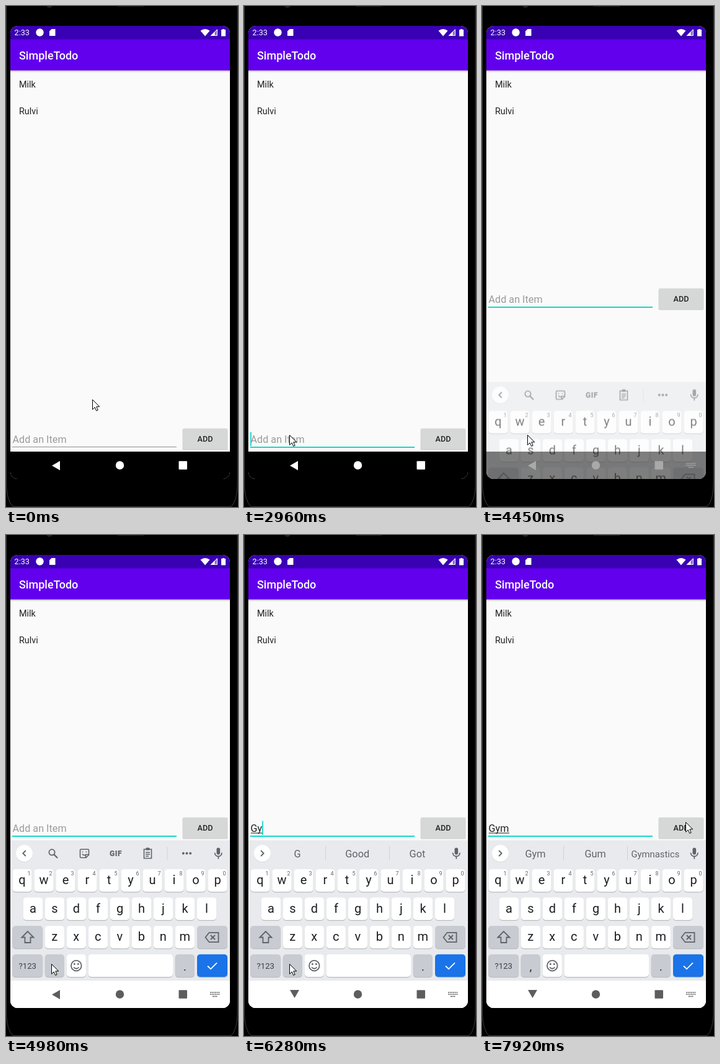
Recreate the animation shown at these times as an HTML page. Size 374x805 px, loop 8000 ms.

```html
<!DOCTYPE html>
<html lang="en">
<head>
<meta charset="utf-8">
<title>Todo app</title>
<style>
html, body { margin: 0; width: 100%; height: 100%; overflow: hidden; background: #000; }
svg { display: block; width: 100vw; height: 100vh; font-family: Roboto, "Noto Sans", sans-serif; }
.mid { text-anchor: middle; }
.line { fill: none; stroke: #5f6368; stroke-width: 1.8; }

/* every change is a hard step on one shared 8 s clock */
#cursor, #field, #hint, #rule, #caret, #under, .typed, #board, #tools, #chevron,
#words, .set, #nav, #navbg, #back, #kbd { animation: 8s step-end infinite; }

#cursor { animation-name: cursor; }
@keyframes cursor {
  0% { transform: translate(139px, 632px); }
  6.25% { transform: translate(180px, 612px); }
  7.75% { transform: translate(205px, 555px); }
  9.25% { transform: translate(128px, 499px); }
  11.125% { transform: translate(139px, 465px); }
  14.25% { transform: translate(149px, 451px); }
  15.75% { transform: translate(115px, 560px); }
  17.25% { transform: translate(78px, 666px); }
  19.125% { transform: translate(75px, 681px); }
  20.625% { transform: translate(73px, 689px); }
  93.75% { transform: translate(244px, 526px); }
  95.625% { transform: translate(302px, 482px); }
  97.125% { transform: translate(330px, 449px); }
  99%, 100% { transform: translate(328px, 461px); }
}

#field { animation-name: field; }
@keyframes field { 0% { transform: none; } 55.625%, 100% { transform: translateY(-225px); } }
#rule { animation-name: rule; }
@keyframes rule {
  0% { fill: #8e8e8e; height: 1px; }
  33.625%, 100% { fill: #1ad6c8; height: 2px; }
}
#caret { animation-name: caret; }
@keyframes caret {
  0% { opacity: 0; transform: none; }
  33.625% { opacity: 1; transform: none; }
  47.125% { opacity: 0; transform: none; }
  54.125% { opacity: 1; transform: none; }
  55.625% { opacity: 0; transform: none; }
  68.875% { opacity: 1; transform: translateX(11px); }
  75.375% { opacity: 1; transform: translateX(19px); }
  85.25% { opacity: 1; transform: translateX(33px); }
  95.625%, 100% { opacity: 0; transform: translateX(33px); }
}
#hint { animation-name: hint; }
@keyframes hint { 0% { opacity: 1; } 68.875%, 100% { opacity: 0; } }
#c1 { animation-name: c1; }
#c2 { animation-name: c2; }
#c3 { animation-name: c3; }
@keyframes c1 { 0% { visibility: hidden; } 68.875%, 100% { visibility: visible; } }
@keyframes c2 { 0% { visibility: hidden; } 75.375%, 100% { visibility: visible; } }
@keyframes c3 { 0% { visibility: hidden; } 85.25%, 100% { visibility: visible; } }
#under { animation-name: under; }
@keyframes under {
  0% { width: 0; }
  72.25% { width: 11px; }
  78.5% { width: 19px; }
  89.875%, 100% { width: 33px; }
}

#board { animation-name: board; }
@keyframes board {
  0% { opacity: 0; transform: translateY(114px); }
  55.625% { opacity: .55; transform: translateY(113.5px); }
  62.25%, 100% { opacity: 1; transform: none; }
}
#tools { animation-name: tools; }
@keyframes tools { 0% { opacity: 1; } 68.875% { opacity: .6; } 70.375% { opacity: .25; } 72.25%, 100% { opacity: 0; } }
#chevron { animation-name: chevron; transform-origin: 29.5px 511.5px; }
@keyframes chevron {
  0% { transform: none; }
  68.875% { transform: rotate(60deg); }
  70.375% { transform: rotate(120deg); }
  72.25%, 100% { transform: rotate(180deg); }
}
#words { animation-name: words; }
@keyframes words { 0% { opacity: 0; } 72.25% { opacity: .35; } 73.75% { opacity: .75; } 75.375%, 100% { opacity: 1; } }
#s1 { animation-name: s1; }
#s2 { animation-name: s2; }
#s3 { animation-name: s3; }
@keyframes s1 { 0% { opacity: 1; } 80.25%, 100% { opacity: 0; } }
@keyframes s2 { 0% { opacity: 0; } 80.25% { opacity: 1; } 91.75%, 100% { opacity: 0; } }
@keyframes s3 { 0% { opacity: 0; } 91.75%, 100% { opacity: 1; } }

#navbg { animation-name: navbg; }
@keyframes navbg { 0% { fill: #000; } 55.625% { fill: rgba(0, 0, 0, .5); } 62.25%, 100% { fill: #fff; } }
#nav { animation-name: nav; fill: currentColor; stroke: none; }
@keyframes nav { 0% { color: #fff; } 55.625% { color: #a9a9a9; } 62.25%, 100% { color: #5d5d5f; } }
#back { animation-name: back; transform-origin: 80.5px 737.5px; }
@keyframes back {
  0% { transform: none; }
  68.875% { transform: rotate(-30deg); }
  70.375% { transform: rotate(-60deg); }
  72.25%, 100% { transform: rotate(-90deg); }
}
#kbd { animation-name: kbd; }
@keyframes kbd { 0% { opacity: 0; } 40.5%, 100% { opacity: 1; } }
</style>
</head>
<body>
<svg viewBox="0 0 374 805" preserveAspectRatio="none">
  <defs>
    <clipPath id="screen"><rect x="7" y="32" width="354" height="728" rx="12"/></clipPath>
    <linearGradient id="shade" x2="0" y2="1">
      <stop offset="0" stop-color="#000" stop-opacity=".25"/>
      <stop offset="1" stop-color="#000" stop-opacity="0"/>
    </linearGradient>
  </defs>

  <rect width="374" height="805"/>
  <path d="M.5 0V768Q1 794 11 804.5H363Q373 794 373.2 768V0" fill="none" stroke="#3c3c3c"/>
  <circle cx="70" cy="-2" r="5" fill="#222"/>
  <rect x="180" width="42" height="1" fill="#222"/>

  <g clip-path="url(#screen)">
    <rect x="7" y="32" width="354" height="728" fill="#fafafa"/>
    <rect x="7" y="103" width="354" height="4" fill="url(#shade)"/>
    <rect x="7" y="32" width="354" height="22" fill="#3a00b4"/>
    <rect x="7" y="53.5" width="354" height="50" fill="#6200ee"/>

    <g fill="#fff">
      <text x="13.5" y="47.3" font-size="12.7">2:33</text>
      <circle cx="54.5" cy="42.5" r="6.2"/>
      <path d="M73.5 37H79.5V48H70V40.5Z"/>
      <path d="M313.5 39.7Q321 34.3 328.5 39.7L321 48.5Z"/>
      <path d="M341 36.5V48H329.5Z" fill-opacity=".4"/>
      <path d="M336.5 41V48H329.5Z"/>
      <path d="M340.3 38V47.4H330.8Z" fill="none" stroke="#fff"/>
      <path d="M349 37H352V38H354V48.5H347V38H349Z"/>
      <text x="21" y="85.8" font-size="18" font-weight="500">SimpleTodo</text>
    </g>
    <g font-size="14.4" fill="#222">
      <text x="21" y="131">Milk</text>
      <text x="21" y="174.3">Rulvi</text>
    </g>

    <g id="field">
      <text id="hint" x="10.5" y="702" font-size="16.2" fill="#9b9b9b">Add an Item</text>
      <text x="10.5" y="702" font-size="16.2" fill="#222"><tspan id="c1" class="typed">G</tspan><tspan id="c2" class="typed">y</tspan><tspan id="c3" class="typed">m</tspan></text>
      <rect id="under" x="11" y="703.4" width="0" height="1.1" fill="#333"/>
      <rect id="rule" x="10" y="708" width="265" height="1" fill="#8e8e8e"/>
      <rect id="caret" x="10.2" y="684.5" width="1.8" height="22.5" fill="#1ad6c8"/>
      <rect x="284.5" y="679.5" width="73" height="34" rx="2" fill="#000" fill-opacity=".16"/>
      <rect x="285" y="678.8" width="72" height="33.2" rx="2" fill="#d6d7d7"/>
      <text class="mid" x="321" y="699.8" font-size="12.6" font-weight="500" fill="#222">ADD</text>
    </g>

    <g id="board">
      <rect x="7" y="490.5" width="354" height="270" fill="#e8eaed"/>
      <circle cx="29.5" cy="512.2" r="13.6" fill="#000" fill-opacity=".1"/>
      <circle cx="29.5" cy="511.5" r="13.5" fill="#fff"/>
      <path id="chevron" class="line" d="M31.8 507L27.3 511.5L31.8 516"/>
      <g id="tools">
        <g class="line">
          <circle cx="74" cy="509.8" r="4.6"/>
          <path d="M77.3 513.2L83 519" stroke-width="2.2"/>
          <path d="M121 505H132Q133.500 505 133.500 506.500V514L129 518.500H121Q119.500 518.500 119.500 517V506.500Q119.500 505 121 505ZM133 513.500H128.500V518" stroke-width="1.6"/>
          <path d="M123 512.500Q125 515.500 128 514M123.500 508.500V510M129.500 508.500V510" stroke-width="1.5"/>
          <path d="M222.500 505H234.500V519.500H222.500ZM225 510H232M225 513H232M225 516H230" stroke-width="1.6"/>
        </g>
        <rect x="225.500" y="502.500" width="6" height="4" rx="1" fill="#5f6368"/>
        <text class="mid" x="177" y="515.500" font-size="12" font-weight="900" letter-spacing=".6" fill="#5f6368">GIF</text>
        <rect x="259.500" y="501" width="1" height="21" fill="#d2d4d8"/>
        <g fill="#5f6368">
          <circle cx="285.800" cy="511.500" r="1.900"/>
          <circle cx="291.500" cy="511.500" r="1.900"/>
          <circle cx="297.200" cy="511.500" r="1.900"/>
        </g>
      </g>
      <rect x="339.500" y="502.500" width="5.600" height="11" rx="2.800" fill="#5f6368"/>
      <path class="line" d="M336.500 510.500Q337 516.300 342.300 516.300T348 510.500M342.300 516V520.500" stroke-width="1.600"/>
      <g id="words" class="mid" font-size="16.300" fill="#5f6368">
        <path d="M131.500 500V523M234.500 500V523" stroke="#d0d2d6"/>
      </g>
      <g id="keys"></g>
      <g class="line">
        <path d="M35 637L25.500 646.500H30.500V655H39.500V646.500H44.500Z"/>
        <path d="M327.500 638.800H342.500V654.200H327.500L321.500 646.500ZM329.800 643L337 650M337 643L329.800 650"/>
        <circle cx="113.300" cy="692" r="8.300"/>
        <path d="M109 694.500Q113.300 699 117.600 694.500"/>
        <path d="M325 692.500L330 697.300L340 687.300" stroke="#fff" style="stroke:#fff"/>
      </g>
      <circle cx="110.300" cy="689.500" r="1.400" fill="#5f6368"/>
      <circle cx="116.300" cy="689.500" r="1.400" fill="#5f6368"/>
    </g>

    <rect id="navbg" x="7" y="716" width="354" height="44"/>
    <g id="nav">
      <path id="back" d="M87 731V746L74 738.500Z"/>
      <circle cx="183.500" cy="738" r="6.700"/>
      <rect x="278.500" y="731.300" width="13.500" height="13.500" rx="1"/>
      <path id="kbd" d="M329 735H344.500M329 738H344.500M333 741.300H340.500" fill="none" stroke="currentColor" stroke-width="1.700" stroke-dasharray="1.900 .8"/>
    </g>
  </g>

  <path id="cursor" d="M.5 .5V16.300L4.200 12.800L6.700 18.400L9.200 17.300L6.800 11.800H11.800Z" fill="#fff" stroke="#000"/>
</svg>
<script>
const NS = "http://www.w3.org/2000/svg";
const keys = document.getElementById("keys");

function add(parent, tag, attrs, text) {
  const el = document.createElementNS(NS, tag);
  for (const k in attrs) el.setAttribute(k, attrs[k]);
  if (text) el.textContent = text;
  parent.appendChild(el);
  return el;
}

function key(x, y, w, fill) {
  add(keys, "rect", { x, y: y + 1, width: w, height: 36.5, rx: 5, fill: "#000", "fill-opacity": .2 });
  add(keys, "rect", { x, y, width: w, height: 36.3, rx: 5, fill });
}

function label(x, y, size, text, fill = "#1c1d1f") {
  add(keys, "text", { class: "mid", x, y, "font-size": size, fill }, text);
}

[["qwertyuiop", 26, 537], ["asdfghjkl", 43.5, 582.4], ["zxcvbnm", 78.3, 628]].forEach(([row, left, y], r) => {
  [...row].forEach((ch, i) => {
    const x = left + i * 35;
    key(x - 15.6, y, 31.2, "#fff");
    label(x, y + 24.3, 20, ch);
    if (!r) label(x + 11, y + 10.3, 9, String((i + 1) % 10), "#5f6368");
  });
});

const grey = "#c8cbd1";
key(10.4, 628, 48.8, grey);
key(308, 628, 49, grey);
key(10.4, 673.7, 48.8, grey);
key(62.7, 673.7, 31.2, grey);
key(97.7, 673.7, 31.2, "#fff");
key(132.5, 673.7, 136.5, "#fff");
key(272.7, 673.7, 31.2, grey);
key(308, 673.7, 49, "#1a73e8");
label(34.8, 697, 13.2, "?123", "#3c4043");
label(78.5, 699.5, 18, ",");
label(288.3, 699.5, 18, ".");

const words = document.getElementById("words");
["G Good Got", "Gy Gym Guy", "Gym Gum Gymnastics"].forEach((set, n) => {
  const g = add(words, "g", { id: "s" + (n + 1), class: "set" });
  set.split(" ").forEach((word, i) => {
    add(g, "text", { x: 86 + i * 96.7, y: 517.6, "font-size": word.length > 6 ? 14.8 : 16.3 }, word);
  });
});
</script>
</body>
</html>
```
